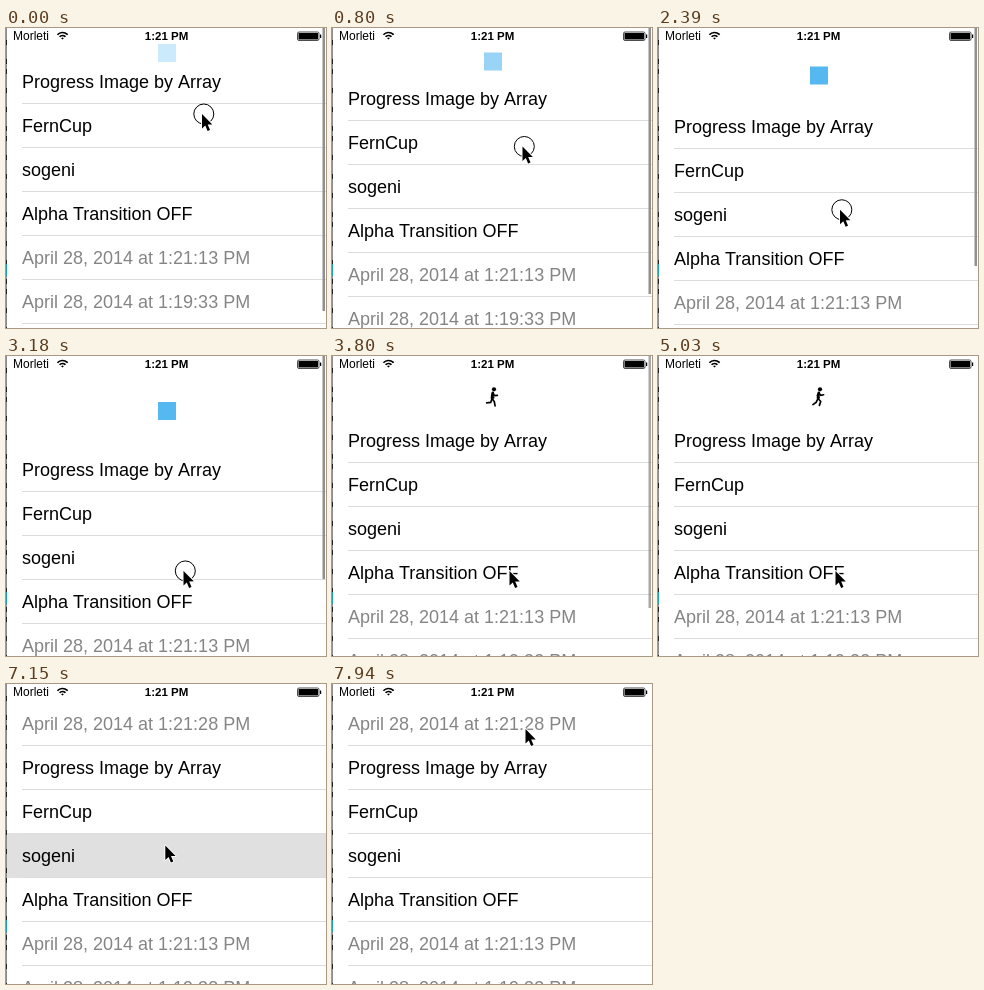
An HTML page with a canvas that plays this animation: 320 px wide and 300 px high, repeating every 8000 ms.

```html
<!DOCTYPE html>
<html lang="en">
<head>
<meta charset="utf-8">
<title>Pull to refresh</title>
<style>
  html, body { margin: 0; width: 320px; height: 300px; overflow: hidden; background: #fff; }
  canvas { display: block; }
</style>
</head>
<body>
<canvas id="stage" width="320" height="300"></canvas>
<script>
const ctx = document.getElementById('stage').getContext('2d');
const LOOP = 8000, STEP = 88.3, ROW = 44;
const FONT = '"Liberation Sans", Arial, sans-serif';
const GREY = '#858585';
const rows = [
  ['Progress Image by Array', '#000'],
  ['FernCup', '#000'],
  ['sogeni', '#000'],
  ['Alpha Transition OFF', '#000'],
  ['April 28, 2014 at 1:21:13 PM', GREY],
  ['April 28, 2014 at 1:19:33 PM', GREY]
];

// Tracks are lists of [time, ...values], joined by straight lines.
const listTrack = [
  [0, 75], [795, 92], [1600, 106], [3180, 135], [3267, 135],
  [3355, 131], [3444, 118], [3532, 109], [3650, 106], [5033, 106], [5300, 105]
];
const pointerTrack = [
  [0, 195.5, 86], [795, 190, 118.5], [1600, 186, 149], [3180, 177, 215],
  [5830, 177, 215], [6180, 155, 174.5], [7064, 155, 174.5], [7945, 193, 45]
];

const ramp = (t, from, to) => Math.min(1, Math.max(0, (t - from) / (to - from)));

function sample(track, t) {
  const i = track.findIndex(key => key[0] > t);
  if (i < 0) return track[track.length - 1].slice(1);
  const a = track[i - 1], b = track[i], p = ramp(t, a[0], b[0]);
  return a.slice(1).map((v, n) => v + (b[n + 1] - v) * p);
}

function rect(x, y, w, h, color) {
  ctx.fillStyle = color;
  ctx.fillRect(x, y, w, h);
}

function text(str, x, y, size, color = '#000', weight = 'normal', align = 'left') {
  ctx.font = `${weight} ${size}px ${FONT}`;
  ctx.textAlign = align;
  ctx.fillStyle = color;
  ctx.fillText(str, x, y);
}

function line(points, width) {
  ctx.lineWidth = width;
  ctx.beginPath();
  points.forEach(p => ctx.lineTo(...p));
  ctx.stroke();
}

function faded(alpha, draw) {
  ctx.globalAlpha = alpha;
  draw();
  ctx.globalAlpha = 1;
}

function row([label, color], bottom) {
  rect(16, bottom, 304, 1, '#dcdcde');
  text(label, 16, bottom - 15, 18, color);
}

function statusBar() {
  text('Morleti', 7, 12, 12);
  text('1:21 PM', 160.5, 12, 11.5, '#000', 'bold', 'center');
  ctx.strokeStyle = '#000';
  ctx.lineWidth = 1.7;
  for (const r of [1, 4, 7]) {
    ctx.beginPath();
    ctx.arc(56.5, 11.5, r, -Math.PI * 0.76, -Math.PI * 0.24);
    ctx.stroke();
  }
  ctx.lineWidth = 0.7;
  ctx.beginPath();
  ctx.roundRect(291.5, 4, 21.5, 8.5, 1.5);
  ctx.stroke();
  rect(292.5, 5, 19.5, 6.5, '#000');
  rect(314, 6.5, 1.2, 3.5, '#000');
}

function leftEdge() {
  rect(0, 0, 1, 300, '#8d8d8d');
  for (let y = 6; y < 300; y += 17) rect(0, y + y * 7 % 9, 1, 5, '#222');
  rect(0, 236, 1, 12, '#18a0b0');
}

function limb([x, y], first, second, length) {
  const next = (p, a) => [p[0] + Math.sin(a) * length, p[1] + Math.cos(a) * length];
  const joint = next([x, y], first);
  line([[x, y], joint, next(joint, second)], 1.7);
}

function runner(cy, phase) {
  ctx.save();
  ctx.translate(160, cy);
  ctx.lineCap = ctx.lineJoin = 'round';
  ctx.strokeStyle = ctx.fillStyle = '#000';
  ctx.beginPath();
  ctx.arc(2, -7.2, 2.1, 0, 7);
  ctx.fill();
  line([[0.8, -3.6], [0, 1.5]], 2.7);
  for (const p of [phase, phase + Math.PI]) {
    const thigh = 0.15 + 0.75 * Math.sin(p);
    limb([0, 2], thigh, thigh - 0.8 - 0.45 * Math.cos(p), 4.1);
    const arm = -0.75 * Math.sin(p);
    limb([1, -3.6], arm, arm + 1.2, 3);
  }
  ctx.restore();
}

function pointer(x, y, pressed) {
  if (pressed) {
    ctx.strokeStyle = '#000';
    ctx.lineWidth = 1;
    ctx.beginPath();
    ctx.arc(x + 2.3, y, 10, 0, 7);
    ctx.stroke();
  }
  ctx.save();
  ctx.translate(x + 0.5, y);
  ctx.beginPath();
  [[0, 0], [0, 14.5], [3.3, 11.5], [5.6, 17], [8, 16], [5.7, 10.6], [10.3, 10.4]]
    .forEach(p => ctx.lineTo(...p));
  ctx.closePath();
  ctx.lineJoin = 'round';
  ctx.lineWidth = 1.8;
  ctx.strokeStyle = '#fff';
  ctx.stroke();
  ctx.fillStyle = '#000';
  ctx.fill();
  ctx.restore();
}

function draw(now) {
  const step = Math.floor((now % LOOP + 8) / STEP), t = step * STEP;
  const top = Math.round(sample(listTrack, t)[0]);
  const iconY = 25 + (top - 75) / 2;

  rect(0, 0, 320, 300, '#fff');
  leftEdge();

  if (t >= 6700) {
    faded(1 - ramp(t, 7064, 7500), () => rect(1, 149, 319, 45, '#d9d9d9'));
  }
  rows.forEach((r, i) => row(r, top + i * ROW));
  faded(ramp(t, 5033, 5640), () => row(['April 28, 2014 at 1:21:28 PM', GREY], top - ROW));

  if (t < 3350) {
    faded(0.3 + 0.7 * ramp(top, 75, 115), () => rect(152, iconY - 9, 18, 18, '#55b8f0'));
  } else if (t < 5110) {
    runner(iconY, 0.9 + (step - 57) * Math.PI / 4);
  }

  statusBar();
  faded(1 - ramp(t, 3700, 4140), () => {
    if (t < 4200) rect(316.5, 0, 2.5, 358 - top, '#909090');
  });
  pointer(...sample(pointerTrack, t), t < 3350 || (t >= 6520 && t < 6880));
}

function tick() {
  draw(performance.now());
  requestAnimationFrame(tick);
}
tick();
</script>
</body>
</html>
```
